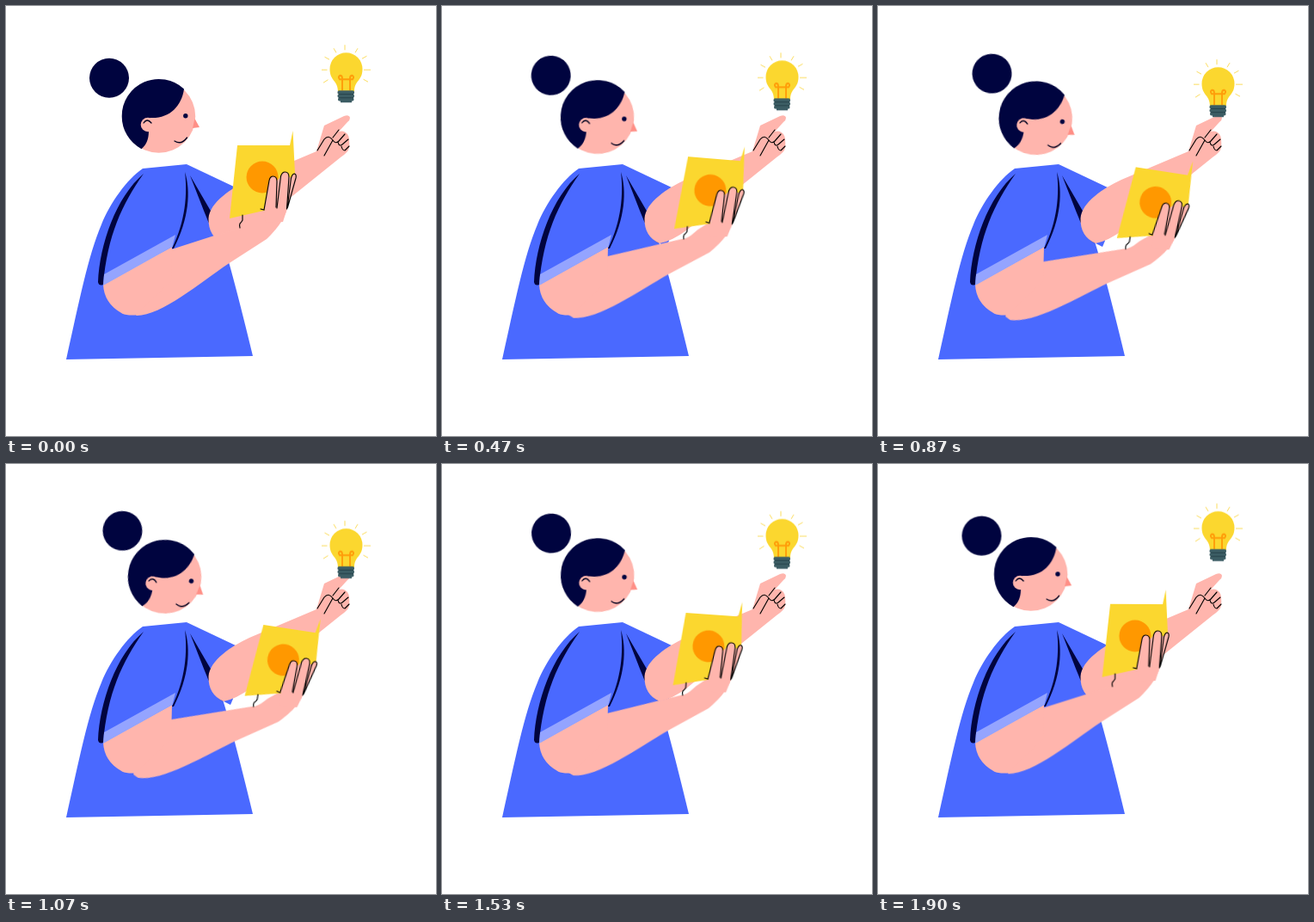
An HTML page for the animation above (1930 ms loop, 500x500 px).

```html
<!DOCTYPE html>
<html lang="en">
<head>
<meta charset="utf-8">
<title>Reader with an idea</title>
<style>
  html, body { margin: 0; width: 100%; height: 100%; overflow: hidden; background: #fff; }
  svg { display: block; width: 100%; height: 100%; }

  .skin { fill: #ffb5ad; }
  .navy { fill: #00043f; }
  .shirt { fill: #4a69ff; }
  .trim { fill: #94a4ff; }
  .paper { fill: #fbd72f; }
  .orange { fill: #ff9800; }
  .nose { fill: #ff8f86; }
  .ink { fill: none; stroke: #000; stroke-width: 1.15; stroke-linecap: round; stroke-linejoin: round; }
  .finger { fill: #ffb5ad; stroke: #000; stroke-width: 1.15; stroke-linecap: round; }
  .face { fill: none; stroke: #00021f; stroke-width: 1.3; stroke-linecap: round; }
  .rays { fill: none; stroke: #fbdc5c; stroke-width: 1; }
  .wire { fill: none; stroke: #ff9d0a; stroke-width: 1.9; }

  .head, .arm, .bulb { animation: 1930ms linear infinite; }
  .head { transform-origin: 163px 171px; animation-name: nod; }
  .arm { transform-origin: 120px 374px; animation-name: lower; }
  .bulb { animation-name: drop; }

  @keyframes nod { 55.44% { transform: rotate(9.8deg); } }
  @keyframes lower { 50% { transform: rotate(9.77deg); } }
  @keyframes drop { 55.44% { transform: translateY(20.8px); } }
</style>
</head>
<body>
<svg viewBox="0 0 500 500">
  <!-- shirt -->
  <path class="shirt" d="M159 189L210 184L240 240L252 274Q263 308 287 407L70 411C86 340 95 292 111 254C121 229 141 201 159 189Z"/>
  <path class="shirt" d="M210 184L267 211L264 273L261 280L251 275L225 240Z"/>
  <path class="navy" d="M214 197L239 240L252 275.500C242 271 236 252 230 238Z"/>
  <path class="navy" d="M160 195C135 230 118 267 113 324Q108 326 107 321C109 277 128 222 160 195Z"/>
  <path class="navy" d="M208 193C215 215 213 247 195 282L193 282C209 250 211 218 208 193Z"/>

  <!-- pointing arm -->
  <path class="skin" d="M283 202L361 169L370 139L393 128Q399 126 400 130Q400 133 397 135L387 146Q393 144 397 149Q400 153 399 165Q398 170 389 176L328 225L284 261Q268 273 253 276Q235 268 235.500 247C237 228 262 212 283 202Z"/>
  <path class="ink" d="M362 168L370 155Q375 149 380 156L370 174M380 153L387 144M380 156Q383 161 387 157L394 149M386 158Q387 164 391 161L398 155M390 163Q391 168 394 168L399 163"/>

  <!-- forearm, card and hand -->
  <g class="arm">
    <path class="skin" d="M146 357L146 305L180 287L270 258Q274 258 280 253L287 246L300 236L328 230Q326 249 303 271L258 300C225 322 181 360 152 360Z"/>
    <path class="paper" d="M269 162H330L333.500 145L336 195L326 232L260 247Z"/>
    <circle class="orange" cx="298" cy="199" r="18.500"/>
    <path class="skin" d="M301 236L306 204L314 204L319 199L328 199L333 199L337 199L327 235L322 251L302 252Z"/>
    <path class="finger" d="M296 236L300 237L306 203Q307 198 310.500 198Q315 198 315 204L314 234"/>
    <path class="finger" d="M315 235L319.500 198Q321 193 324.500 193Q329 193 329 199L326.500 236"/>
    <path class="finger" d="M327 235L331.500 200Q333 195 335.500 195Q338 196 337 200L327.500 234"/>
    <path class="ink" d="M275 243V249Q274 251 272 253Q271 255 272 258"/>
  </g>

  <!-- upper arm and cuff -->
  <path class="skin" d="M113 324L193 280L192 320L150 359.500Q140 360 135 357.500Q114 346 113 324Z"/>
  <path class="trim" d="M114 312L197 266L193.500 280L113 325Z"/>

  <!-- head -->
  <g class="head">
    <circle class="navy" cx="120" cy="83.800" r="23"/>
    <circle class="skin" cx="177.700" cy="128.200" r="42.500"/>
    <path class="nose" d="M219.500 131L225 141L217 142Z"/>
    <path class="navy" d="M207 96.500A43 43 0 0 0 134.700 128.200A43 43 0 0 0 157.500 166.200C165 160 166 152 166 144L168 130C190 131 204 117 207 96.500Z"/>
    <circle class="skin" cx="165" cy="138" r="8.300"/>
    <path class="face" d="M160 136Q164 130 169 136M196 157Q204 162 210.500 153"/>
    <circle class="navy" cx="208.800" cy="127.800" r="2.700"/>
  </g>

  <!-- light bulb -->
  <g class="bulb">
    <g transform="translate(0 -.8)">
      <path class="rays" d="M394 46V52M381 50L384 55M409 50L406 55M370.500 60L376 63M419.500 59L414 62M367 75H373.500M416 75H424M369 90L374.500 86.500M415.500 86L421 89"/>
      <path class="paper" d="M376.500 74a19 19 0 0 1 38 0C414.500 88 405 87 405 100H386C386 87 376.500 88 376.500 74Z"/>
      <path class="wire" d="M391 99V85Q391 81.500 388.500 81.500Q385.500 83 388 86H403Q405.500 83 402.500 81.500Q400 81.500 400 85V99"/>
      <g fill="#3c5d64">
        <rect x="389" y="108" width="13" height="5"/>
        <rect x="385.500" y="99" width="19.500" height="4.500" rx="1.800"/>
        <rect x="385.500" y="103.200" width="19.500" height="4.500" rx="1.800"/>
        <rect x="386" y="107.400" width="18.500" height="4" rx="1.800"/>
      </g>
      <path d="M387 103.300H404M387 107.500H404" stroke="#27434b"/>
    </g>
  </g>
</svg>
</body>
</html>
```
